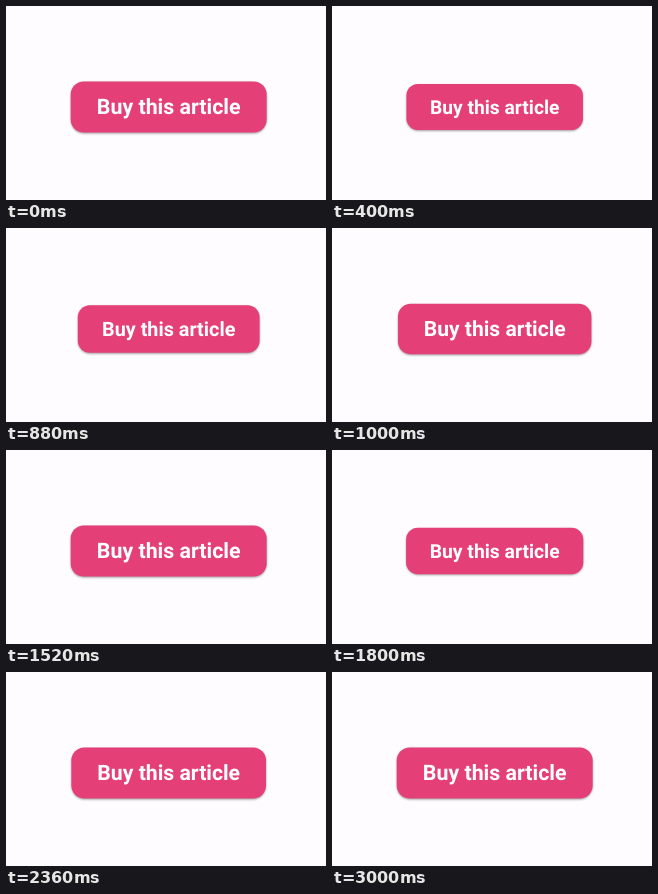
An HTML page for the animation above (3040 ms loop, 320x194 px).

```html
<!DOCTYPE html>
<html lang="en">
<head>
<meta charset="utf-8">
<title>Button press</title>
<style>
  html, body { margin: 0; width: 100%; height: 100%; overflow: hidden; background: #fefcfe; }
  svg { display: block; width: 100vw; height: 100vh; }
  text {
    font: 700 21.35px Roboto, sans-serif;
    fill: #fff;
    text-anchor: middle;
    text-rendering: geometricPrecision;
  }
</style>
</head>
<body>
<svg viewBox="0 0 320 194">
  <defs>
    <filter id="soft" x="-10%" y="-20%" width="120%" height="150%">
      <feGaussianBlur stdDeviation="1"/>
    </filter>
  </defs>
  <g id="button">
    <rect x="-97.8" y="-24.4" width="195.6" height="51" rx="13" fill="#000" opacity=".38" filter="url(#soft)"/>
    <rect x="-98" y="-25.6" width="196" height="51.2" rx="13" fill="#e53f77"/>
    <text x="0" y="7.4">Buy this article</text>
  </g>
</svg>
<script>
  const LOOP = 3040;
  const OMEGA = 0.021; // spring frequency per ms
  const PRESSED = 0.9;
  const taps = [{ down: 70, up: 832 }, { down: 1563, up: 2152 }];
  const button = document.getElementById("button");

  // Critically damped spring from 0 to 1
  function spring(ms) {
    const x = OMEGA * Math.max(0, ms);
    return 1 - (1 + x) * Math.exp(-x);
  }

  function scaleAt(t) {
    const press = taps.reduce((sum, tap) => sum + spring(t - tap.down) - spring(t - tap.up), 0);
    return 1 - (1 - PRESSED) * press;
  }

  function draw(t) {
    button.setAttribute("transform", `translate(162.7 101) scale(${scaleAt(t).toFixed(5)})`);
  }

  const start = performance.now();
  function tick() {
    draw((performance.now() - start) % LOOP);
    requestAnimationFrame(tick);
  }
  draw(0);
  requestAnimationFrame(tick);
</script>
</body>
</html>
```
